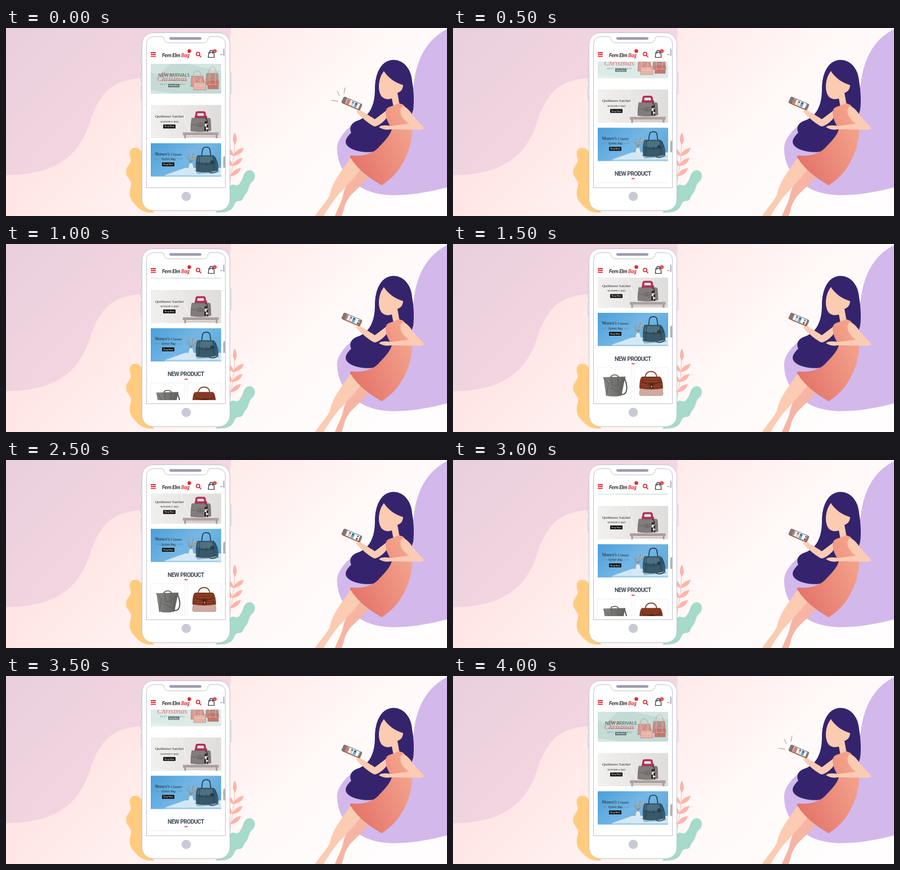
Write an HTML page that moves like this. It is 783 px wide and 336 px high and loops after 4500 ms.

```html
<!DOCTYPE html>
<html lang="en">
<head>
<meta charset="utf-8">
<title>Mobile shop</title>
<style>
  @property --step { syntax: "<number>"; inherits: true; initial-value: 0; }
  html, body { margin: 0; width: 100%; height: 100%; overflow: hidden; background: #fff3f2; }
  svg { display: block; width: 783px; height: 336px; animation: scroll 4.5s step-end infinite; }
  .page { transform: translateY(calc(var(--step) * -27.7px)); }
  .mini { transform: translateX(calc(var(--step) * -2px)); }
  .rest { animation: rest 4.5s step-end infinite; }
  .scrolled { animation: scrolled 4.5s step-end infinite; }
  @keyframes scroll {
    0%, 88.888%, 100% { --step: 0; }
    11.111%, 77.777% { --step: 1; }
    22.222%, 66.666% { --step: 2; }
    33.333%, 55.555% { --step: 3; }
    44.444% { --step: 4; }
  }
  @keyframes rest { 0%, 88.888%, 100% { opacity: 1; } 11.111% { opacity: 0; } }
  @keyframes scrolled { 0%, 88.888%, 100% { opacity: 0; } 11.111% { opacity: .5; } }
  text { text-anchor: middle; fill: #222; }
  .serif { font: 7px "Liberation Serif", serif; }
  .script { font: italic 7.6px "Liberation Serif", serif; }
  .sans { font: 4px Lato, sans-serif; }
  .logo { font: italic 700 9.5px Lato, sans-serif; letter-spacing: -.3px; text-anchor: start; }
  .heading { font: 600 10.2px Roboto, sans-serif; letter-spacing: -.55px; fill: #434b57; }
  .line { fill: none; stroke-linecap: round; stroke-linejoin: round; }
</style>
</head>
<body>
<svg viewBox="0 0 783 336">
  <defs>
    <linearGradient id="sky" gradientUnits="userSpaceOnUse" x1="0" y1="0" x2="500" y2="500">
      <stop offset=".2" stop-color="#ffe1e1"/><stop offset=".42" stop-color="#ffebea"/>
      <stop offset=".7" stop-color="#fff9f8"/><stop offset="1" stop-color="#fffdfd"/>
    </linearGradient>
    <linearGradient id="wave" gradientUnits="userSpaceOnUse" x1="0" y1="0" x2="225" y2="225">
      <stop stop-color="#e9cfdd"/><stop offset="1" stop-color="#f5d7e1"/>
    </linearGradient>
    <linearGradient id="dress" x1="0" y1=".8" x2="1" y2=".2">
      <stop stop-color="#e27168"/><stop offset="1" stop-color="#f5a68f"/>
    </linearGradient>
    <linearGradient id="wall" x2="1" y2=".5">
      <stop stop-color="#4c9fd9"/><stop offset=".6" stop-color="#74b7e5"/><stop offset="1" stop-color="#61aadb"/>
    </linearGradient>
    <linearGradient id="plaster" x2="1">
      <stop stop-color="#f1f0ef"/><stop offset="1" stop-color="#dfdddc"/>
    </linearGradient>
    <linearGradient id="leather" x2="1">
      <stop stop-color="#858583"/><stop offset="1" stop-color="#626361"/>
    </linearGradient>
    <clipPath id="view"><path d="M256 60H389.5V279H256Z"/></clipPath>
    <clipPath id="miniView"><path d="M7 1H32V10.5H7Z"/></clipPath>
    <g id="leafPair">
      <path d="M0 0C2-9 8-13 18-15C16-7 11-2 0 0Z"/>
      <path d="M0 0C-9-3-10-9-10-15C-4-12 0-7 0 0Z"/>
    </g>
    <g id="button">
      <rect x="-11" y="-3.5" width="22" height="7" rx=".7" fill="#151515"/>
      <text class="sans" y="1.3" font-style="italic" font-weight="700" style="fill:#fff;font-size:3.8px">Shop Now</text>
    </g>
  </defs>

  <!-- Backdrop -->
  <path fill="url(#sky)" d="M0 0H783V336H0Z"/>
  <path fill="url(#wave)" d="M0 0H399C398 60 370 90 240 90C190 92 168 115 152 160C135 215 105 262 0 263Z"/>
  <path fill="#d3b8ec" d="M783 2C752 18 730 48 724 100C718 140 665 140 624 167C600 182 586 202 588 220C590 248 604 266 622 279C650 302 700 306 783 285Z"/>

  <!-- Plants -->
  <path fill="#ffcc7f" d="M230 214C219 214 218 224 221 233C224 242 213 246 213 257C213 268 224 271 222 282C218 292 219 304 225 311C233 320 240 331 262 330V250L242 225C240 217 236 214 230 214Z"/>
  <path fill="#a6dacb" d="M433 254C443 255 445 268 437 275C430 281 432 289 426 296C420 302 423 309 414 309C404 310 407 318 400 324C394 329 386 330 372 330L390 300C398 284 397 279 404 280C410 282 413 282 418 273C422 266 422 255 433 254Z"/>
  <g fill="#ffb4a8">
    <path d="M406 187C411 195 411 202 406 209C402 202 402 195 406 187Z"/>
    <use href="#leafPair" x="404" y="229"/>
    <use href="#leafPair" x="402" y="247"/>
    <use href="#leafPair" x="399" y="265"/>
    <path class="line" stroke="#ffb4a8" d="M406 204Q405 240 396 282"/>
  </g>

  <!-- Phone -->
  <g fill="#fff" stroke="#b9bac8" stroke-width=".9">
    <path d="M241.5 48H239.8V60H241.5M241.5 75H239.8V97H241.5M241.5 104H239.8V128H241.5M397.5 80H399.5V117H397.5"/>
    <rect x="241.5" y="8.5" width="156" height="318" rx="20"/>
    <path d="M249.5 285.5V29Q249.5 15.5 263 15.5H277Q280 15.5 280.5 19Q281.5 26.5 289 26.5H350Q357.5 26.5 358.5 19Q359 15.5 362 15.5H376Q389.5 15.5 389.5 29V285.5Z"/>
  </g>
  <rect x="290" y="16.3" width="57" height="4.8" rx="2.4" fill="#9a9eaf"/>
  <circle cx="320" cy="301" r="8.3" fill="#c9cad7"/>

  <!-- Shop header -->
  <path class="line" stroke="#e3262e" stroke-width="1.9" d="M258 44H265M258 47.3H265M258 50.6H265" style="stroke-linecap:square"/>
  <text class="logo" x="277" y="51.5">Fern Elm <tspan fill="#e3262e">Bag</tspan></text>
  <circle cx="325.5" cy="41.3" r="3.2" fill="#e3262e"/>
  <g class="line" stroke="#e3262e" stroke-width="1.7">
    <circle cx="341" cy="46.4" r="3.1"/><path d="M343.5 49L346 51.6"/>
  </g>
  <path class="line" stroke="#252530" stroke-width="1.2" d="M360 43.5H369L369.8 52.5H359.2ZM362 45.5V42Q362 39.8 364.5 39.8Q367 39.8 367 42V45.5"/>
  <circle cx="370.6" cy="41.2" r="3.3" fill="#e8343c"/>
  <text class="sans" x="370.6" y="42.6" style="fill:#fff">0</text>
  <path stroke="#6d4650" d="M381 47.4H384"/>
  <path fill="#bcbcbf" d="M385.5 37H388V50H385.5Z"/>

  <!-- Shop page -->
  <g clip-path="url(#view)"><g class="page">
    <!-- Arrivals -->
    <path fill="#c3dad5" d="M257 64H382V117.3H257Z"/>
    <path fill="#d4e5e1" d="M257 64H292L270 85L257 79ZM257 111L300 117.3H257ZM322 64H382V78Z"/>
    <path class="scrolled" fill="#f5fafa" d="M257 64H382V117.3H257Z"/>
    <g fill="#d49a90" stroke="#a96c65" stroke-width=".5">
      <path d="M329 86H350L353 105H328Z"/>
      <path fill="#bd9188" d="M356 81H376L378 102H354Z"/>
      <path fill="#e6b3a8" d="M334 97H355V111H333Z"/>
      <path fill="#c3776f" d="M359 95H377V109H358Z"/>
      <path class="line" d="M333 86C332 73 346 73 346 86M360 81C360 65 373 65 373 81M338 97C339 87 351 87 351 97M362 95C363 86 374 86 374 95"/>
      <path class="line" stroke="#f2ded8" d="M334 86V104M346 86V104M361 81V101M372 81V101M334 103H355M359 101H377"/>
    </g>
    <text class="script" x="286" y="85" style="fill:#dd6868">Merry</text>
    <text class="script" x="295" y="95" style="fill:#df6d6d;font-size:13px">Christmas</text>
    <text class="sans" x="296" y="102" letter-spacing=".75" style="fill:#708b88">BEST DEALS SALE</text>
    <g class="rest">
      <text class="sans" x="298" y="87" style="font-size:7.8px;fill:#3f5352">NEW ARRIVALS</text>
      <path stroke="#ae6464" stroke-width=".9" d="M276 93.4H321" stroke-dasharray="3 .8"/>
    </g>
    <path fill="#657c7a" d="M288 100H308V106H288Z"/>
    <text class="sans" x="298" y="104.3" style="fill:#fff;font-size:3.5px">Shop Now</text>

    <!-- Satchel -->
    <path fill="url(#plaster)" d="M257 137.5H382V197H257Z"/>
    <path class="line" stroke="#f8f7f6" d="M257 150L282 137.5M257 191L284 197M307 137.5L331 197"/>
    <path fill="#aaa19e" d="M314 186.5H377.5V191.5H314Z"/>
    <path stroke="#a49691" stroke-width="3" d="M318 191V197M374 191V197"/>
    <path stroke="#c9a39d" d="M320 194H373"/>
    <path class="line" stroke="#b52e58" stroke-width="3.5" d="M337.5 160L338 153Q338 150.5 341 150.5H350Q353 150.5 353 153L353.5 160"/>
    <path fill="#b52e58" d="M335 157H357V161.5H335Z"/>
    <path fill="#827d7c" stroke="#646060" stroke-width=".6" d="M330 161H360Q363 161 363 164L364 183Q349 187 328 184Q328 170 330 161Z"/>
    <path class="line" stroke="#5f5a5a" stroke-width=".8" d="M329 172Q346 176 363 172M341 170H349V176H341ZM345 170V176"/>
    <path class="line" stroke="#292629" stroke-width="1.2" d="M354 161Q360 165 356 172"/>
    <circle cx="355" cy="169" r="2.7" fill="#302c2e"/>
    <path fill="#e9e4df" d="M353.5 171H357.5L359 181H352Z"/>
    <path fill="#302c2e" d="M352 176H355V184H352ZM356 173H359V178H356ZM357 181H359V185H357Z"/>
    <text class="serif" x="290" y="160">Quillmere Satchel</text>
    <text class="sans" x="290.5" y="168.6" font-weight="700" letter-spacing=".35">WOMEN'S BAG</text>
    <use href="#button" x="290" y="176"/>

    <!-- Classic -->
    <path fill="url(#wall)" d="M257 206H382V265.4H257Z"/>
    <path fill="#d3e8f6" d="M282 263L318 250H382V263Z"/>
    <path fill="#a9cfe9" d="M282 263H382V265.4H282Z"/>
    <path fill="#e9e7df" d="M326 242H331L333 250Q329 253 324 250Z"/>
    <path class="line" stroke="#8b7458" stroke-width=".8" d="M328 240L324 224M329 240L333 223M329 239L339 230M327 239L321 230"/>
    <path class="line" stroke="#d99b73" stroke-width="2.3" stroke-dasharray=".2 5" d="M324 225L327 237M334 224L330 237M338 230L331 236"/>
    <path fill="#6a93ad" opacity=".6" d="M335 254L376 250L379 258L340 261Z"/>
    <path class="line" stroke="#243f50" stroke-width="1.7" d="M347 230L349 217Q350 213 356 213Q361 213 362 217L364 230"/>
    <path fill="#385969" stroke="#294757" stroke-width=".7" d="M340 228H369Q374 234 375 254Q356 260 338 256Q336 238 340 228Z"/>
    <path fill="#4d7180" d="M342 230H367L369 239Q356 243 340 239Z"/>
    <path class="line" stroke="#203947" stroke-width=".8" d="M339 241Q357 247 372 240M356 239V246M344 229L342 256M367 229L370 255"/>
    <path class="line" stroke="#263f4d" stroke-width="1.4" d="M371 231Q379 248 375 256Q369 261 361 258"/>
    <circle cx="366" cy="240" r="3.4" fill="#263f4d"/>
    <text x="288.5" y="227.5" class="serif"><tspan class="script">Women's</tspan> Classic</text>
    <text class="script" x="288.5" y="235.7" style="font-size:5.6px">Stylish Bag</text>
    <path stroke="#557d9d" stroke-width=".5" d="M264 234H274M303 234H313"/>
    <use href="#button" x="288" y="243.7"/>

    <!-- New products -->
    <text class="heading" x="319.3" y="291.9">NEW PRODUCT</text>
    <path fill="#ec4a50" d="M317 296H322.5V298H317Z"/>
    <path fill="none" stroke="#f0eff0" stroke-width=".9" d="M257 304H317.5V430H257ZM322 304H382V430H322Z"/>
    <path class="line" stroke="#4f5150" stroke-width="1.5" d="M280 328V321Q281 317 287 317Q293 317 294 321V328"/>
    <path class="line" stroke="#555653" stroke-width="2" d="M305 324C311 339 309 350 302 352Q291 351 280 342"/>
    <path fill="url(#leather)" d="M267 321L306 320L299 354Q286 357 272 354Z"/>
    <path class="line" stroke="#565855" stroke-width=".9" d="M267 322L276 332L272 354M306 321L298 332L299 353M282 320V336H293V320M279 340L300 350"/>
    <path class="line" stroke="#773c29" stroke-width="1.6" d="M341 322Q342 311 352 311Q361 311 362 322"/>
    <path fill="#d0aaa0" stroke="#9b7267" stroke-width=".6" d="M333 336H371L373 351Q373 354 369 354H335Q331 354 331 351Z"/>
    <path fill="#803620" d="M336 320H367Q372 322 373 341Q352 345 331 341Q331 322 336 320Z"/>
    <path class="line" stroke="#b2613d" stroke-width="1.2" stroke-dasharray=".2 3" d="M336 324H368M335 329H370M334 334H371M339 338H366"/>
    <path class="line" stroke="#57271b" stroke-width="1.3" d="M336 329Q352 339 368 329"/>
    <path fill="#57271b" d="M349 331H356V341H349Z"/>
    <circle cx="352.5" cy="338" r="1.3" fill="#cfad85"/>
    <path fill="#b4b4b8" d="M385.5 231L389.5 228V250H385.5Z"/>
  </g></g>

  <!-- Shopper -->
  <g fill="#fbcbb2">
    <path fill="#f6b5a2" d="M628 248C612 268 602 282 599 296C597 310 590 320 584 336H596C600 326 600 318 606 308C612 296 632 282 646 264Z"/>
    <path d="M612 232C598 252 582 272 577 290C575 306 560 318 549 336H564C568 328 574 320 582 308C594 292 616 272 632 250Z"/>
    <path fill="#35246d" d="M688 57C708 57 720 76 721 95C724 112 725 132 723 146C720 158 714 164 708 168L688 180C684 196 668 210 660 218C650 225 620 222 609 213C599 205 603 197 613 187C608 175 616 168 626 165C644 158 655 140 655 110C655 78 668 57 688 57Z"/>
    <path d="M671 77C662 88 660 106 664 117C667 126 676 129 685 126L688 141L699 138L695 116C702 114 705 108 705 102C692 98 679 90 671 77Z"/>
    <path d="M676 147L655 163L631 148C626 144 623 148 622 150C627 156 648 175 655 176C664 174 672 166 678 158Z"/>
    <path fill="url(#dress)" d="M675 146C678 139 690 140 697 134L705 137C714 146 720 160 721 180C722 208 708 256 667 281C648 270 626 255 611 231C610 228 612 227 616 228C635 230 653 223 662 213C674 200 683 191 685 180C675 165 673 155 675 146Z"/>
    <path d="M701 144C705 134 718 148 722 156L742 178Q743 182 734 182L684 181C675 183 668 181 662 177C668 173 676 174 684 175L716 171C706 165 698 154 701 144Z"/>
  </g>
  <g transform="translate(600 122) rotate(23.5)">
    <rect width="36" height="12.5" rx="2.5" fill="#7d777c"/>
    <path fill="#b05f40" d="M2 10.5H36Q35 12.5 33 12.5H2Z"/>
    <path fill="#fff" d="M7 1H32V10.5H7Z"/>
    <g clip-path="url(#miniView)"><g class="mini">
      <path fill="#c5826d" d="M8 1.3H14V10.5H8Z"/>
      <path fill="#d5d2d3" d="M17 2H21.5V10H17Z"/>
      <path fill="#78717b" d="M18 2H21V5H18Z"/>
      <path fill="#5ca9dc" d="M23 2H28V10H23Z"/>
      <path fill="#365b73" d="M24 2H27V5H24Z"/>
      <path fill="#777778" d="M33 2H36V5H33Z"/>
      <path fill="#8b432e" d="M33 6.5H36V10H33Z"/>
    </g></g>
  </g>
  <path class="line rest" stroke="#87838b" stroke-width=".9" d="M578 129L589 131M588 113L592 121M602 107L600 117"/>
</svg>
</body>
</html>
```
